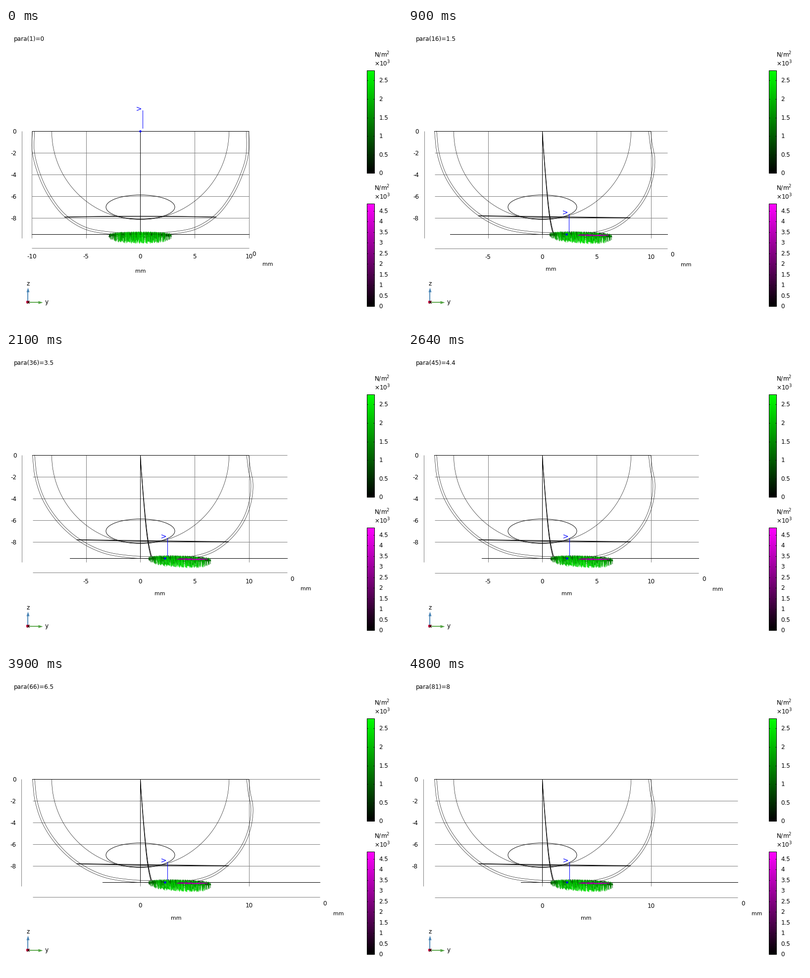
Write a matplotlib script that moves like this. It is 800 by 600 pixels and loops after 4.86 s.

```python
import numpy as np
import matplotlib.pyplot as plt
from matplotlib.animation import FuncAnimation
from matplotlib.collections import LineCollection
from matplotlib.colors import LinearSegmentedColormap
from matplotlib.patches import Ellipse, Rectangle

FRAMES, STEP = 81, 60
PT = 0.72           # points per pixel at 100 dpi
MM = 21.94          # pixels per millimetre
CX, TOP, FLOOR = 271, 209, 418
GRAY = "#808080"
HALF = 0.49         # pixel centre, just short of snapping to the next one

plt.rcParams["font.family"] = "DejaVu Sans"
plt.rcParams["mathtext.fontset"] = "dejavusans"

fig = plt.figure(figsize=(8, 6), dpi=100, facecolor="white")
ax = fig.add_axes([0, 0, 1, 1])
ax.axis("off")


def label(x, y, s, ha="center", size=12, **kw):
    """Text whose digits are centred on y."""
    return ax.text(x, y + 0.36 * size - 0.5, s, ha=ha, va="baseline",
                   fontsize=size * PT, **kw)


def line(xs=(), ys=(), color="black", width=1.0, **kw):
    return ax.plot(xs, ys, color=color, lw=width * PT, **kw)[0]


def spline(pts, n=14):
    """Smooth curve through the points, spaced by chord length."""
    t = np.r_[0, np.cumsum(np.hypot(*np.diff(pts, axis=0).T))]
    slope = np.gradient(pts, t, axis=0)
    s = np.linspace(0, 1, n, endpoint=False)[None, :, None]
    h = np.diff(t)[:, None, None]
    p0, p1 = pts[:-1, None], pts[1:, None]
    m0, m1 = slope[:-1, None] * h, slope[1:, None] * h
    c = ((2 * s**3 - 3 * s**2 + 1) * p0 + (s**3 - 2 * s**2 + s) * m0
         + (3 * s**2 - 2 * s**3) * p1 + (s**3 - s**2) * m1)
    return np.vstack([c.reshape(-1, 2), pts[-1:]])


def inset(curve, d):
    tx, ty = np.gradient(curve, axis=0).T
    size = np.hypot(tx, ty)
    return curve + d * np.column_stack([ty, -tx]) / size[:, None]


# shell outline at rest and when fully dragged, left to right
REST = np.array([
    (53, 209), (52, 245), (65, 298), (85, 340), (118, 382), (158, 407),
    (208, 417), (271, 418), (334, 417), (384, 407), (424, 382), (457, 340),
    (477, 298), (488, 262), (490, 235), (489, 209)], float)
DRAGGED = np.array([
    (53, 209), (58, 252), (74, 300), (100, 340), (144, 381), (196, 407),
    (255, 417), (325, 418), (380, 417), (418, 405), (449, 383), (482, 340),
    (496, 298), (498.5, 265), (493, 235), (490, 209)], float)


def color_bar(y0, y1, unit, count, color):
    cmap = LinearSegmentedColormap.from_list("bar", ["black", color])
    ax.imshow(np.linspace(1, 0, 256)[:, None], cmap=cmap, aspect="auto",
              extent=(729, 744, y1, y0), interpolation="bilinear", zorder=1)
    ax.add_patch(Rectangle((729, y0), 15, y1 - y0, fill=False, ec="black",
                           lw=PT, zorder=2))
    for k in range(count):
        y = y1 - k * unit / 2
        label(753, y, f"{k / 2:g}", "left")
        for x in (729, 742):
            line((x, x + 2), (y, y), zorder=2, solid_capstyle="butt")
    label(744, y0 - 31.5, "N/m$^2$", "left")
    label(744, y0 - 13.5, r"$\times$10$^3$", "left")
    return cmap


greens = color_bar(86, 294, 75.2, 6, "#00ff00")
pinks = color_bar(356, 564, 43, 10, "#ff00ff")

# axis triad
for dx, dy, color in ((0, -1, "#4682b4"), (1, 0, "#55a445")):
    x, y = 44 + 30 * dx, 556 + 30 * dy
    line((44, 44 + 22 * dx), (556, 556 + 22 * dy), color, 1.8)
    bx, by = x - 9 * dx, y - 9 * dy
    ax.fill([x, bx + 3 * dy, bx - 3 * dy], [y, by + 3 * dx, by - 3 * dx],
            color=color, lw=0)
ax.add_patch(Rectangle((41, 553), 6, 5, color="#c8003c", lw=0, zorder=3))
label(44, 555.5, "x", size=11, zorder=4)
label(44, 518, "z")
label(82, 555, "y")

# fixed geometry
ax.add_patch(Ellipse((CX, 362.5), 139, 49, fill=False, ec="black",
                     lw=0.9 * PT, zorder=3))
arc = np.linspace(0, np.pi, 120)
line(CX + 179 * np.cos(arc), TOP + 179 * np.sin(arc), width=0.6)
line((CX, CX), (TOP, FLOOR), zorder=3)
line((53, 490), (TOP, TOP), zorder=3)

# moving geometry
grid = ax.add_collection(LineCollection([], colors=GRAY, lw=PT, zorder=1.5))
plate = line(zorder=3)
outer, inner = line(width=0.6), line(width=0.6)
stems = [line(zorder=3), line(zorder=3)]
decks = [line(zorder=3), line(zorder=3)]
needle = line(color="blue", zorder=7)
needle_dot = line(color="blue", marker="o", ms=2.2, zorder=7)
needle_tag = label(0, 0, "V", color="blue", rotation=90, zorder=7)
needle_tag.set_va("center")

title = label(15, 22, "", "left")
z_labels = [label(0, TOP + 1 - z * MM, str(z), "right")
            for z in range(0, -10, -2)]
y_labels = {y: label(CX + y * MM, 0, str(y)) for y in range(-10, 11, 5)}
depth_zero = label(0, 0, "0")
depth_unit = label(0, 0, "mm", size=11)
width_unit = label(0, 0, "mm", size=11)

# contact points: a along the motion, b towards the back
rng = np.random.default_rng(4)
a, b = np.meshgrid(np.linspace(-0.98, 0.98, 30), np.linspace(-0.9, 0.9, 11))
a = (a + rng.uniform(-0.03, 0.03, a.shape)).ravel()
b = (b + rng.uniform(-0.08, 0.08, b.shape)).ravel()
keep = a**2 + b**2 < 1
a, b = a[keep], b[keep]
load = (1 - a**2 - b**2) ** 0.22
ragged = rng.uniform(0.78, 1.06, a.size)
shade = rng.uniform(0.85, 1.15, a.size)
drag = load * (0.12 + 0.88 * np.clip(0.2 + 0.6 * a - 0.55 * b, 0, 1))
grip = (b > 0.55) | ((drag > 0.5) & (b < -0.35))


def arrows(n, cmap, z, width):
    q = ax.quiver(np.zeros(n), np.zeros(n), np.zeros(n), np.zeros(n),
                  np.zeros(n), cmap=cmap, angles="xy", units="xy",
                  scale_units="xy", scale=1, width=width, headwidth=4,
                  headlength=7, headaxislength=6, minlength=0, zorder=z)
    q.set_clim(0, 1)
    return q


normal = arrows(a.size, greens, 5, 1.0)
shear = arrows(int(grip.sum()), pinks, 6, 0.8)

ax.set_xlim(-HALF, 800 - HALF)
ax.set_ylim(600 - HALF, -HALF)


def place(q, x, y, u, v, c):
    # direction is given in data units, so the stored start points follow
    q.X, q.Y = x, y
    q.XY = np.column_stack([x, y])
    q.set_offsets(q.XY)
    q.set_UVC(u, v, c)


def draw_axes(p):
    left = 52 + 1.2 * min(1, p / 0.5)
    right = CX + (10 + p) * MM
    rail = left - 20.3 - 0.31 * p
    base = 445.5 + 0.37 * p
    ticks = [y for y in y_labels
             if y % (10 if p >= 5 else 5) == 0 and (p == 0 or y > -10)]
    segs = [[(left, TOP - z * MM), (right, TOP - z * MM)]
            for z in range(0, -10, -2)]
    segs += [[(CX + y * MM, TOP), (CX + y * MM, 426)] for y in ticks]
    segs += [[(rail, TOP), (rail, 426)], [(left, base), (right, base)]]
    grid.set_segments(segs)
    plate.set_data([52 + p * MM, right], [FLOOR, FLOOR])

    for t in z_labels:
        t.set_x(rail - 11)
    for y, t in y_labels.items():
        t.set_visible(y in ticks)
        t.set_y(467 + 0.3 * p)
    depth_zero.set_position((right + 10.5, 462 + 0.37 * p))
    depth_unit.set_position((right + 38, 481.7 + 0.37 * p))
    width_unit.set_position(((left + right) / 2,
                             496 if p == 0 else 491 + 0.37 * p))


def draw_body(u):
    curve = spline(REST + u * (DRAGGED - REST))
    outer.set_data(*curve.T)
    inner.set_data(*inset(curve, 4.3).T)

    t = np.linspace(0, 0.98, 60)
    bend = u * 24 * (0.75 * t**1.15 + 0.25 * t**8)
    for k, stem in enumerate(stems):
        stem.set_data(CX + bend * (1 - 0.07 * k), TOP + 209 * t)

    s = np.linspace(-1, 1, 60)
    mid = 271 + 24.5 * u
    sag = 381 + 1.6 * s**2 * (1 - u) + u * (1 + 2 * s)
    for k, deck in enumerate(decks):
        deck.set_data(mid + 153 * s, sag + 0.9 * k * (1 - s**2) * u + 0.4 * k)


def draw_contact(p, u):
    x = CX + 79 * u + 63 * a
    y = FLOOR - 3.2 * b + 1.5 * u * a
    tail = y + 17.5 * load * ragged + 2 * u * a * load
    head = y - 5 * load
    lean = -1.5 * u * (1 - 0.4 * a)
    place(normal, x - lean, tail, lean, head - tail,
          np.clip(0.85 * load * shade, 0, 1))

    pull = min(1, p / 0.3) * drag[grip]
    sx = x[grip] - 4
    sy = 416 - 5.5 * b[grip] * load[grip] + 2 * a[grip]
    reach = np.minimum(15 * pull, CX + 79 * u + 65 - sx)
    place(shear, sx, sy, reach, 0.06 * reach, np.clip(pull, 0, 1))
    shear.set_visible(p > 0)


def draw_needle(p, u):
    if p == 0:
        x, y, dot = 276, 167, (271, 209)
    else:
        x, y, dot = 276 + 50 * u, 377, (271 + 50 * u, 418)
    needle.set_data([x, x], [y, y + 36])
    needle_dot.set_data([dot[0]], [dot[1]])
    needle_tag.set_position((x - 6, y - 4.5))


def update(i):
    p = i / 10
    # the pad sticks to the plate, then slips
    u = 1 - (1 - min(p / 1.6, 1)) ** 1.35
    title.set_text(f"para({i + 1})={p:g}")
    draw_axes(p)
    draw_body(u)
    draw_contact(p, u)
    draw_needle(p, u)
    return []


anim = FuncAnimation(fig, update, frames=FRAMES, interval=STEP,
                     init_func=lambda: [], repeat=True, repeat_delay=0,
                     blit=False)
plt.show()
```
